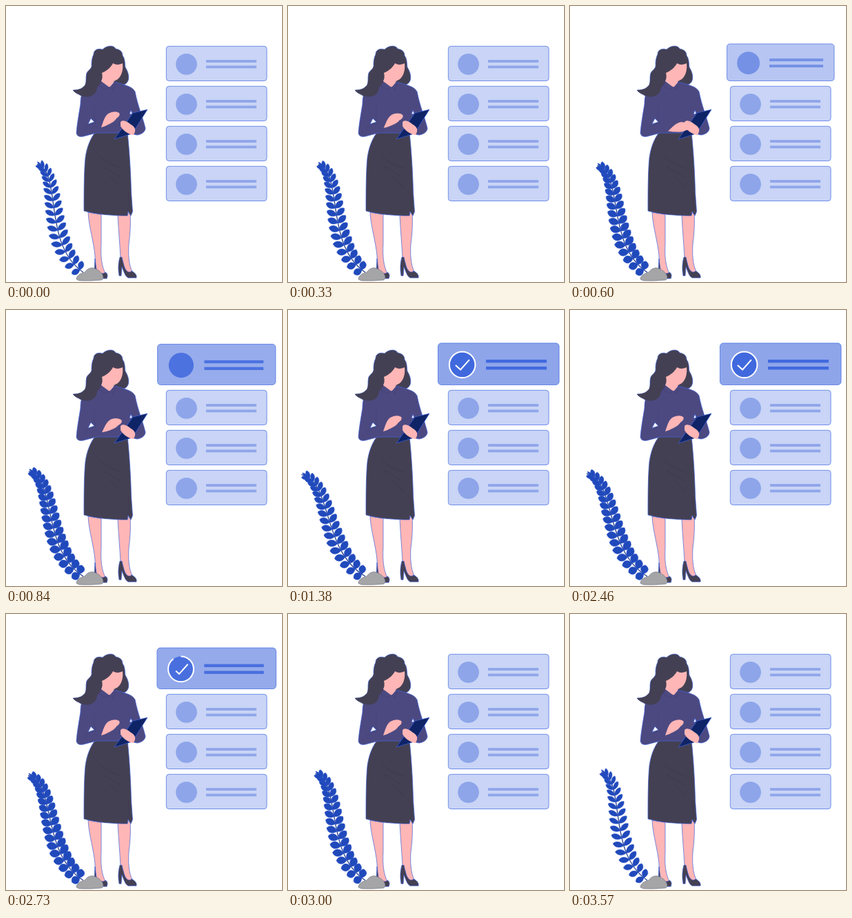
These frames come from a looping animation (400 by 400 pixels, 3600 ms). An HTML page:

```html
<!DOCTYPE html>
<html lang="en">
<head>
<meta charset="utf-8">
<title>Choosing a card</title>
<style>
html, body { margin: 0; width: 100%; height: 100%; overflow: hidden; background: #fff; }
svg { display: block; width: 100vw; height: 100vh; }
</style>
</head>
<body>
<svg viewBox="0 0 400 400">
  <g id="cards"></g>

  <g id="plant" fill="#2049bb" stroke="#2d55cc" stroke-width=".5">
    <path id="stem" fill="none" stroke="#27418f" stroke-width="1.3"/>
  </g>

  <g id="woman" stroke="#3f63dc" stroke-width=".7" stroke-linejoin="round">
    <g fill="#ffb6b6">
      <path d="M119 299C120 320 127 340 129 362L130 388 145 389C138 378 137 360 138 345L138 302Z"/>
      <path d="M162 303C163 325 165 345 166 365L174 388 183 385C178 375 177 360 178 345C180 330 181 315 180 300Z"/>
    </g>
    <g fill="#444053">
      <path d="M129 366L128 385 138 395 146 395C148 391 147 387 144 386C140 389 134 388 131 382Z"/>
      <path d="M165 364C163 371 162 380 164 391L167 391 168 378C171 386 173 392 177 394L189 394C190 389 186 386 182 384C178 388 173 384 171 376Q169 369 168 364Z"/>
      <path d="M130 182L176 183C179 210 181 245 181.5 270L183.5 298 181 304 177 298 176 304C155 304 130 302 113 297C113 270 113 240 115 220C117 205 122 192 130 182Z"/>
    </g>
    <path d="M134 217Q149 230 168 235M140 233Q155 241 167 249M151 247Q160 255 168 264M178 270L179 297" fill="none" stroke="#3d394b"/>

    <path fill="#444053" d="M127 70C127 63 134 61 140 63C146 57 156 56 159 62C165 63 169 66 169 72C173 77 172 84 173 89C177 95 179 103 177 108C175 114 168 116 163 114L140 112C136 116 131 119 131 123C127 132 117 133 109 130C104 127 100 126 97 122C106 122 112 119 115 114C117 109 115 103 117 97C120 92 125 91 124 84C124 79 125 74 127 70Z"/>
    <path fill="#4c4981" d="M137 107C130 114 122 130 116 119C109 123 108 135 108 142C106 155 103 170 102 184C103 189 107 190 112 189L131 184 176 184 190 187C197 186 202 182 202 177C198 160 191 145 187 124C183 117 176 116 168 113L157 110 150 117Z"/>
    <path fill="#444053" stroke="none" d="M138 102L138 111C134 115 131 119 131 123C127 132 117 133 109 130C104 127 100 126 97 122C106 122 112 119 115 114L119 98Z"/>
    <path fill="#ffb6b6" stroke="none" d="M139 97C146 94 152 89 155 83C160 86 165 85 169 83C170 92 168 101 162 106C159 108 156 108 156 111L150 118 138 109C140 105 140 101 139 97Z"/>
    <path d="M137 108L135 116 144 121 150 117 155 122 158 112" fill="none" stroke="#423f77"/>
    <path d="M123 163L119 171 128 168ZM181 151L179 157 183 156Z" fill="#fff"/>
    <path d="M128 145Q126 158 130 169L112 177" fill="none" stroke="#454279"/>

    <path fill="#0f2466" d="M184 155L205 150 183 185 157 193Z"/>
    <path id="hand" fill="#ffb6b6" stroke="none" d="M138 176C141 168 142 161 148 156C153 153 160 152 164 155C166 158 163 161 160 163C157 168 150 171 144 174Z"/>
    <path fill="#ffb6b6" stroke="none" d="M166 168C170 164 176 168 180 171C185 174 188 177 187 182L185 187C177 186 169 180 166 174Z"/>
  </g>

  <path fill="#a5a5a7" stroke="#6b7083" stroke-width=".6" d="M102 396C102 391 108 387 114 386C118 380 124 378 130 381C137 384 141 389 141 394L139 397Q122 399 106 398Z"/>
</svg>

<script>
const LOOP = 3600;
const $ = id => document.getElementById(id);

function add(parent, tag, attrs) {
  const el = document.createElementNS('http://www.w3.org/2000/svg', tag);
  for (const k in attrs) el.setAttribute(k, attrs[k]);
  return parent.appendChild(el);
}

const clamp = u => Math.max(0, Math.min(1, u));
const span = (t, a, b) => clamp((t - a) / (b - a));
const smooth = u => u * u * (3 - 2 * u);
const mix = (a, b, u) => a + (b - a) * u;
const blend = (a, b, u) => `rgb(${a.map((v, i) => Math.round(mix(v, b[i], u)))})`;

const PALE = [201, 212, 246], MID = [142, 165, 234], FULL = [65, 105, 222];

// cards
function makeCard(y) {
  const g = add($('cards'), 'g', {});
  const box = add(g, 'rect', { x: 232.3, y: y + .3, width: 145.7, height: 50.2, rx: 4,
    stroke: '#4169e1', 'stroke-width': .7, 'vector-effect': 'non-scaling-stroke' });
  const inner = add(g, 'g', {});
  add(inner, 'circle', { cx: 261.5, cy: y + 26.3, r: 15.4 });
  for (const dy of [20.2, 28.5])
    add(inner, 'rect', { x: 290, y: y + dy, width: 73, height: 3.7 });
  const card = { g, box, inner };
  tint(card, 0);
  return card;
}

function tint(card, u) {
  card.box.setAttribute('fill', blend(PALE, MID, u));
  card.inner.setAttribute('fill', blend(MID, FULL, u));
}

const [chosen] = [58, 116, 174, 232].map(makeCard);
const mark = add(chosen.g, 'g', { fill: 'none', stroke: '#fff', 'stroke-width': 1.7 });
const strokes = [
  add(mark, 'circle', { cx: 261.5, cy: 84.3, r: 15.6, transform: 'rotate(-90 261.5 84.3)' }),
  add(mark, 'path', { d: 'M270 78.3L259.4 90.2 253.4 84.8' })
];
strokes.forEach(s => s.setAttribute('pathLength', 1));

// plant
const REST = [112, 386, 52, 345, 82, 240, 45, 229.5];
const BENT = [112, 386, 47, 348, 63, 248, 17, 239.5];
const PAIRS = 17;
const leaves = [];
for (let i = 0; i < PAIRS * 2 + 1; i++) leaves.push(add($('plant'), 'path', {}));

function bezier(p, s) {
  const r = 1 - s;
  const at = k => r*r*r*p[k] + 3*r*r*s*p[k+2] + 3*r*s*s*p[k+4] + s*s*s*p[k+6];
  const slope = k => r*r*(p[k+2]-p[k]) + 2*r*s*(p[k+4]-p[k+2]) + s*s*(p[k+6]-p[k+4]);
  return [at(0), at(1), Math.atan2(slope(1), slope(0)) * 180 / Math.PI];
}

function drawLeaf(el, x, y, angle, len, wide) {
  el.setAttribute('d', `M0 0C${len * .3} ${-wide} ${len * .8} ${-wide} ${len} 0C${len * .8} ${wide} ${len * .3} ${wide} 0 0Z`);
  el.setAttribute('transform', `translate(${x} ${y}) rotate(${angle})`);
}

function drawPlant(u) {
  const p = REST.map((v, i) => mix(v, BENT[i], u));
  const full = 1 + .4 * Math.sqrt(4 * u * (1 - u)); // foliage looks denser mid-sway
  $('stem').setAttribute('d', `M${p[0]} ${p[1]}C${p.slice(2)}`);
  for (let i = 0; i < PAIRS; i++) {
    const s = .03 + .87 * i / (PAIRS - 1);
    const [x, y, a] = bezier(p, s);
    const len = 16.5 * Math.min(1, .75 + s) * (1 - .35 * s * s);
    const wide = 5.4 * (1 - .55 * s * s) * full;
    const open = mix(66, 22, s * s);
    drawLeaf(leaves[2 * i], x, y, a - open, len, wide);
    drawLeaf(leaves[2 * i + 1], x, y, a + open, len, wide);
  }
  const [x, y, a] = bezier(p, .9);
  drawLeaf(leaves[2 * PAIRS], x, y, a, 13, 2);
}

function sway(t) {
  const u = 1 - Math.abs(1 - t / (LOOP / 2));
  const half = v => .5 * Math.pow(2 * v, 2.3);
  return u < .5 ? half(u) : 1 - half(1 - u);
}

function render(t) {
  const leave = 1 - span(t, 2700, 3000);
  const grow = smooth(span(t, 355, 995)) * leave;
  const k = 1 + .205 * grow;
  chosen.g.setAttribute('transform', `translate(305 108.5) scale(${k}) translate(-305 -108.5)`);
  tint(chosen, grow);

  const drawn = span(t, 1000, 1320) * leave;
  mark.setAttribute('visibility', drawn > 0 ? 'visible' : 'hidden');
  strokes.forEach(s => s.setAttribute('stroke-dasharray', drawn < 1 ? `${drawn} 2` : 'none'));

  const tap = smooth(span(t, 240, 600)) - smooth(span(t, 600, 960));
  $('hand').setAttribute('transform', `translate(${3 * tap} ${6 * tap}) rotate(${28 * tap} 140 178)`);
  drawPlant(sway(t));
}

const start = performance.now();
function tick() {
  render((performance.now() - start) % LOOP);
  requestAnimationFrame(tick);
}
tick();
</script>
</body>
</html>
```
